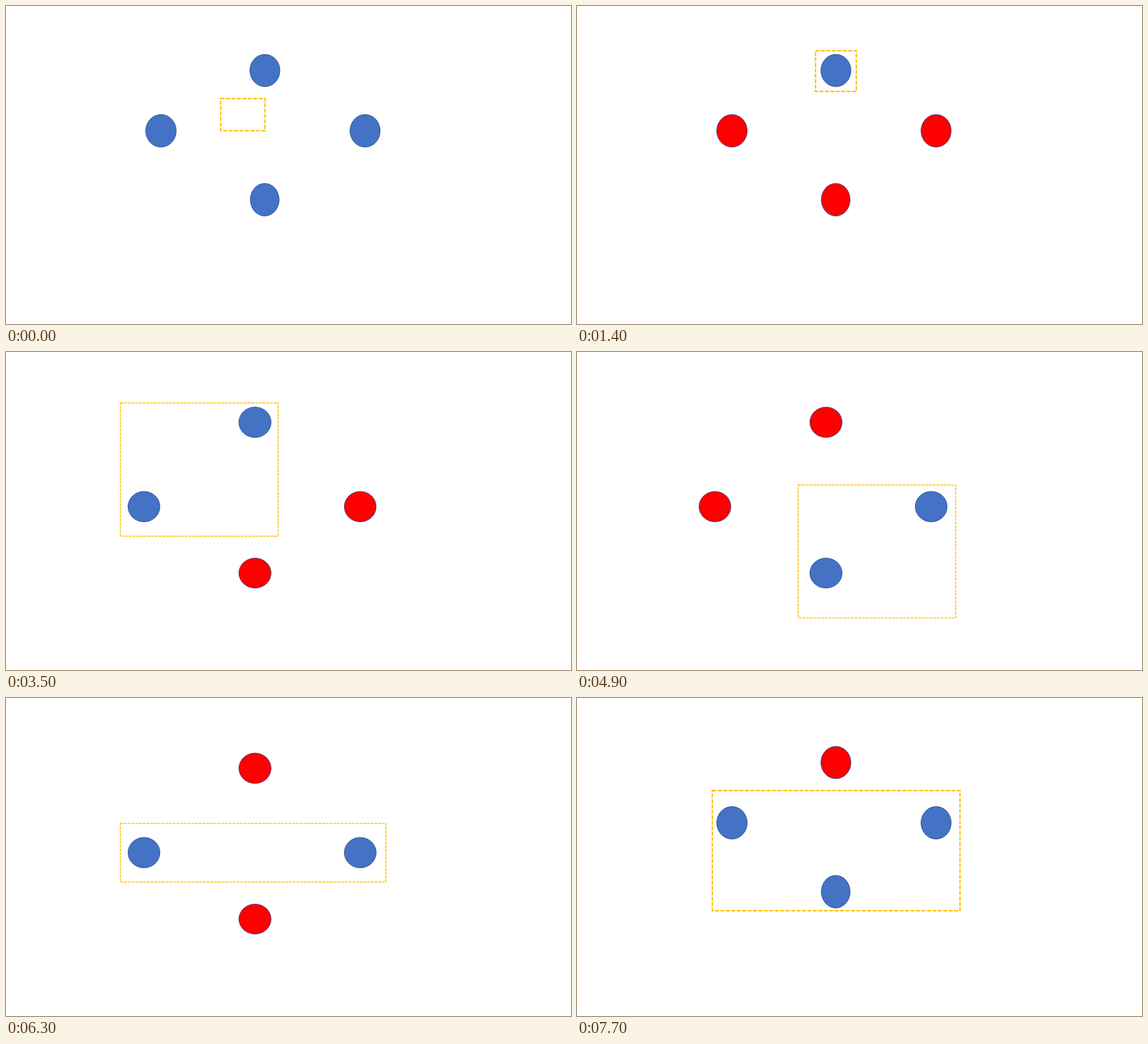
An HTML page for the animation above (8 s loop, 998x561 px).

```html
<!DOCTYPE html>
<html lang="en">
<head>
<meta charset="utf-8">
<title>Subsets of four points</title>
<style>
  html, body { margin: 0; width: 100%; height: 100%; overflow: hidden; background: #fff; }
  svg { display: block; width: 998px; height: 561px; }
  ellipse { fill: #f00; stroke: #2f528f; stroke-width: 1; }
  ellipse.in { fill: #4472c4; }
  rect { fill: none; stroke: #ffc000; }
  .bold rect { stroke-width: 2.4; stroke-dasharray: 7.2 2.4; }
  .thin rect { stroke-width: 1.65; stroke-dasharray: 4.95 1.65; }
</style>
</head>
<body>
<svg id="stage" viewBox="0 0 998 561">
  <ellipse id="L"/><ellipse id="T"/><ellipse id="R"/><ellipse id="B"/>
  <rect id="box"/>
</svg>
<script>
const LOOP = 8000, STEP = 700;

// Ellipses as cx, cy, rx, ry
const layouts = {
  bold: {
    L: [273.7, 220.2, 27, 28.8], T: [457.3, 113.8, 26.6, 28.5],
    R: [634.3, 220.2, 26.7, 28.8], B: [457, 341.7, 25.5, 28.8]
  },
  thin: {
    L: [243.7, 272.8, 28.2, 26.9], T: [439.8, 124, 28.5, 26.9],
    R: [625.7, 272.8, 28.2, 26.9], B: [439.8, 390, 28.5, 26.5]
  }
};

// Layout, blue points, box as left, top, right, bottom
const steps = [
  ['bold', 'LTRB', [379.2, 163.2, 457.5, 220]],
  ['bold', 'L', [234.2, 184, 313, 256]],
  ['bold', 'T', [421.3, 79, 493.3, 150.8]],
  ['bold', 'R', [594, 183, 677.8, 257]],
  ['bold', 'B', [422.3, 304.2, 492.5, 379]],
  ['thin', 'LT', [202, 89.8, 480.5, 324.8]],
  ['thin', 'TR', [382.7, 80.8, 660.3, 315.3]],
  ['thin', 'RB', [390.6, 234.6, 669, 469]],
  ['thin', 'LB', [206.8, 228.8, 485.2, 464]],
  ['thin', 'LR', [202, 221.3, 671.2, 324.6]],
  ['thin', 'TB', [388, 71.8, 492, 436.2]],
  ['bold', 'LRB', [239, 163.2, 676.5, 375.2]]
];

const byId = id => document.getElementById(id);
const setAll = (el, attrs) => {
  for (const name in attrs) el.setAttribute(name, attrs[name]);
};

function draw([layout, inside, [left, top, right, bottom]]) {
  byId('stage').setAttribute('class', layout);
  for (const [id, [cx, cy, rx, ry]] of Object.entries(layouts[layout])) {
    setAll(byId(id), { cx, cy, rx, ry, class: inside.includes(id) ? 'in' : '' });
  }
  setAll(byId('box'), { x: left, y: top, width: right - left, height: bottom - top });
}

let start, shown = -1;
function tick(now) {
  start ??= now;
  const index = Math.floor(((now - start) % LOOP) / STEP);
  if (index !== shown) draw(steps[shown = index]);
  requestAnimationFrame(tick);
}
draw(steps[0]);
requestAnimationFrame(tick);
</script>
</body>
</html>
```
